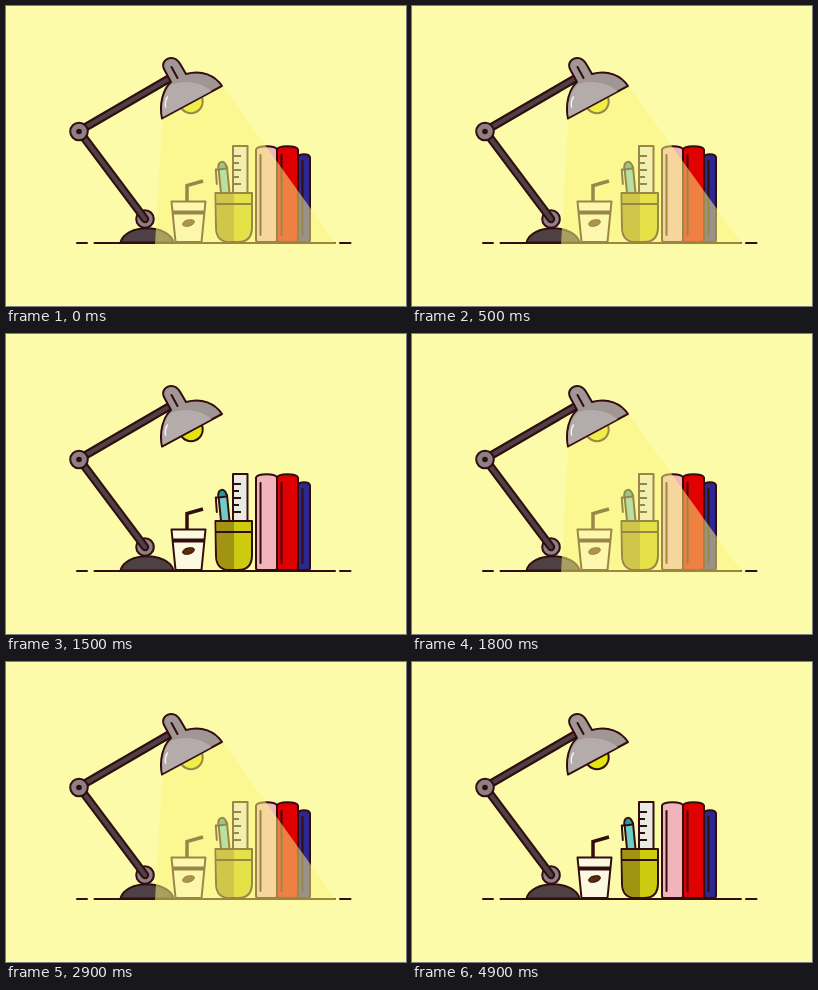
Recreate the animation shown at these times as an HTML page. Size 400 by 300 pixels, loop 5000 ms.

```html
<!DOCTYPE html>
<html lang="en">
<head>
<meta charset="utf-8">
<title>Flickering desk lamp</title>
<style>
  html, body { margin: 0; width: 100%; height: 100%; overflow: hidden; background: #fcfbaa; }
  svg { display: block; width: 100%; height: 100%; }
  .ink { stroke: #330c10; stroke-width: 2; stroke-linecap: round; stroke-linejoin: round; }
  .line { fill: none; }
</style>
</head>
<body>
<svg viewBox="0 0 400 300">
  <path class="ink line" stroke-width="2.400" d="M71 237H81M88.500 237H329M334 237H344.500"/>

  <g id="lamp" class="ink">
    <path fill="#4d4143" d="M114.500 236.500C119 217.500 163 217.500 167.500 236.500Z"/>
    <circle cx="139" cy="213" r="8.800" fill="#8d8185"/>
    <g class="line">
      <path stroke-width="8.500" d="M139 213L73 125L165 71.500"/>
      <path stroke="#4d4146" stroke-width="4.300" d="M139 213L73 125L165 71.500"/>
    </g>
    <circle cx="73" cy="125.500" r="8.800" fill="#8d8185"/>
    <circle cx="73" cy="125.500" r="2.800" fill="#330c10" stroke="none"/>
    <circle cx="185" cy="95.500" r="11.700" fill="#e3e60c"/>
    <path fill="#a09694" d="M156 112.500C153 98 157 83 165 76L158.500 64C154.500 57 160 52 165.500 52C170 52 172.500 55 174.500 58.500L180 68C196 63.500 209 69.500 216 80Z"/>
    <path fill="#b4acaa" stroke="none" d="M156.800 111C155 98 158 85 165.500 78.500C180 73 196 77 205.500 85Z"/>
    <path class="line" d="M165.500 61L171.500 72"/>
    <path class="line" stroke="#f5f2ee" stroke-width="1.500" d="M159.500 101C159 97 160 93 161.500 91"/>
  </g>

  <g id="drink" class="ink">
    <path class="line" stroke-width="3.500" stroke-linecap="butt" stroke-linejoin="miter" d="M181 195V179.500L197 175"/>
    <path fill="#fdf9e0" d="M165.500 195.500H199.500L195.500 236H169.500Z"/>
    <path class="line" stroke-width="4" stroke-linecap="butt" d="M167 206.500H198.500"/>
    <ellipse cx="182.500" cy="217" rx="6" ry="3" fill="#5a2b08" stroke-width="1" transform="rotate(-15 182.500 217)"/>
  </g>

  <g id="stationery" class="ink">
    <path fill="#e9eae4" d="M227 187V140H241.500V187Z"/>
    <path class="line" stroke-linecap="butt" d="M228 150H235M228 157H233M228 164H235M228 171H233M228 178H235"/>
    <path fill="#6fcbc5" d="M212.500 162L221 161L223.500 187H215Z"/>
    <path fill="#269a9c" d="M212.500 163.500C210.500 154 220 153 221 162.500Z"/>
    <path class="line" d="M213 163.500H209.800L210.800 178"/>
    <path fill="#cccb10" d="M209.500 187H246V221Q246 236 232 236H224Q210 236 210 221Z"/>
    <path fill="#a09412" stroke="none" d="M210.500 188H228V235H224Q211 235 211 221Z"/>
    <path class="line" d="M210 198H246"/>
  </g>

  <g id="books" class="ink">
    <path fill="#f2b4bb" d="M250 143.500Q251 140.300 260.500 140.300T271 143.500V234Q271 236 269 236H252Q250 236 250 234Z"/>
    <path fill="#e00000" d="M271 143.500Q272 140.300 281.500 140.300T292 143.500V234Q292 236 290 236H273Q271 236 271 234Z"/>
    <path fill="#2c2890" d="M292 151Q293 148.300 298 148.300T304 151V234Q304 236 302 236H292Z"/>
    <path class="line" d="M254.500 149V229M275.500 149V229M296.500 155V229"/>
  </g>

  <path id="beam" fill="#fcf57d" fill-opacity=".52" d="M156.500 113L217 80.500L330.500 238.500H149Z"/>
</svg>
<script>
  const LOOP = 5000;
  // Each time flips the light, which is on at the start of the loop.
  const flips = [
    100, 200, 400, 500, 600, 700, 800, 900, 1000, 1100, 1200, 1300, 1500, 1800,
    2000, 2100, 2200, 2300, 2400, 2500, 2600, 2700, 2800, 2900, 4700, 4800, 4900
  ];
  const beam = document.getElementById("beam");

  function draw() {
    const time = performance.now() % LOOP;
    const flipCount = flips.filter(flip => flip <= time).length;
    beam.style.visibility = flipCount % 2 ? "hidden" : "visible";
    requestAnimationFrame(draw);
  }
  draw();
</script>
</body>
</html>
```
